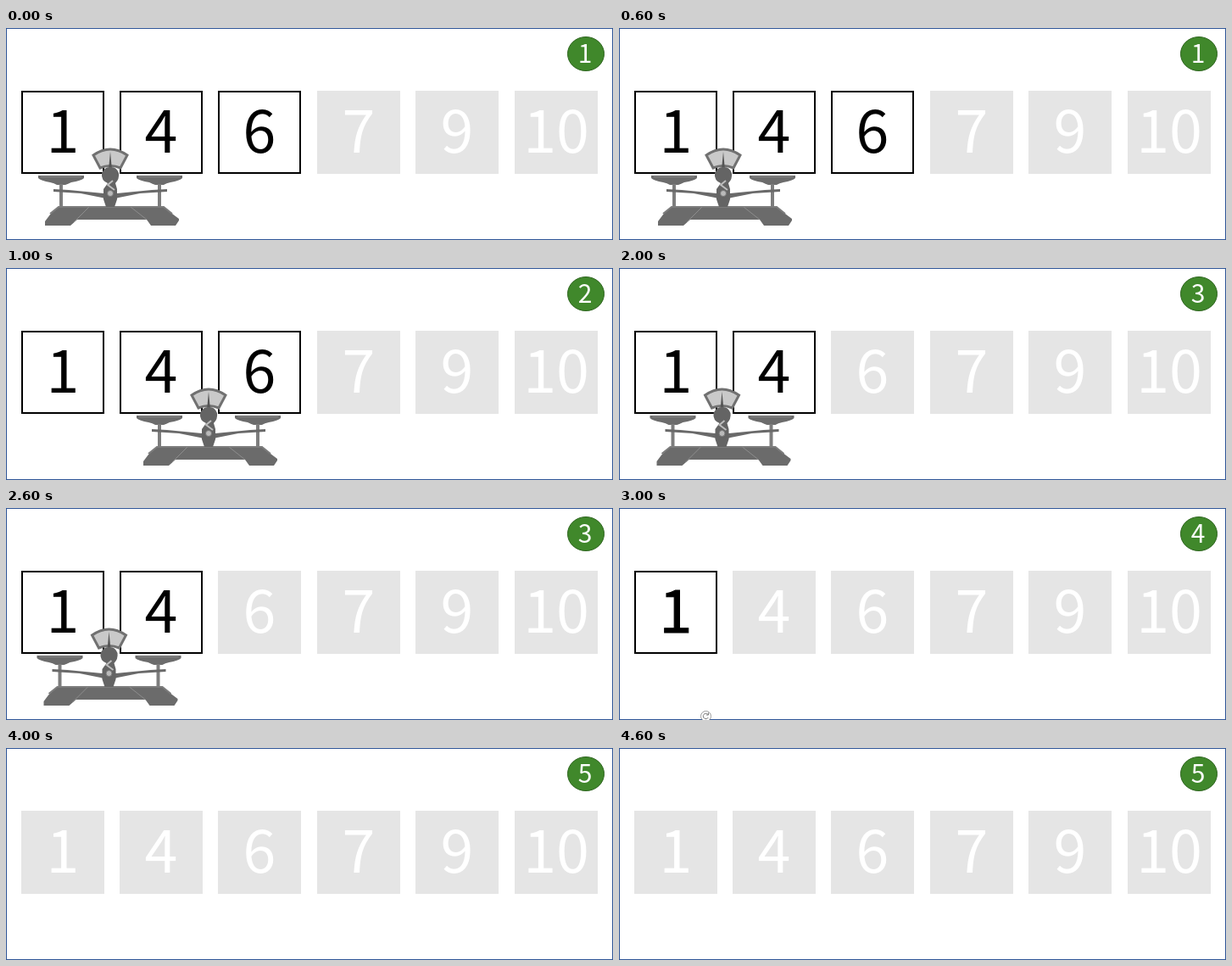
An HTML page that plays this animation: 716 by 250 pixels, repeating every 5 s.

```html
<!DOCTYPE html>
<html lang="en">
<head>
<meta charset="utf-8">
<title>Binary search with a balance</title>
<style>
  html, body { margin: 0; width: 100%; height: 100%; overflow: hidden; background: #fff; }
  svg { display: block; width: 716px; height: 250px; }
  text { font-family: "Noto Sans CJK JP", "Noto Sans CJK", "Noto Sans", sans-serif; font-weight: 350; text-anchor: middle; }
</style>
</head>
<body>
<svg viewBox="0 0 716 250">
  <defs>
    <g id="arm">
      <path d="M-85 174H-31V177Q-34 180 -46 182Q-50 184 -53 185H-63Q-66 183 -71 182Q-82 180 -85 177Z" fill="#6c6c6c"/>
      <path d="M-82 175.5H-34" stroke="#858585"/>
      <path d="M-58 184V212" stroke="#7d7d7d" stroke-width="4"/>
      <path d="M-67 190L-49 191L-8 195L-3 191V202L-10 200L-35 195L-67 193Z" fill="#696969"/>
    </g>
  </defs>
  <rect x=".5" y=".5" width="715" height="249" fill="#fff" stroke="#2f5597"/>
  <g id="cards"></g>
  <g id="scale">
    <use href="#arm"/>
    <use href="#arm" transform="scale(-1 1)"/>
    <path d="M-61 211H63L73 219L81 225V227L77 233H48L43 226H-39L-47 233H-77V228L-71 220Z" fill="#6b6b6b"/>
    <path d="M-71 219L-61 211H63L73 219" fill="none" stroke="#7c7c7c" stroke-width="2"/>
    <path d="M-25 211L-43 229M24 211L43 226" stroke="#8d8d8d"/>
    <path d="M-20 150Q0 136 20 150L12 165Q0 160 -12 165Z" fill="#c9c9c9" stroke="#717171" stroke-width="3"/>
    <path d="M-1.7 164L0 146L1.7 164Z" fill="#555"/>
    <path d="M-10 171Q-6 163 0 164Q7 163 10 171Q11 178 6 183L8 190V202L5 211H-5L-8 202V190L-3 183Q-11 180 -10 171Z" fill="#646464"/>
    <path d="M3 180L-3 185L5 191" fill="none" stroke="#bdbdbd" stroke-width="2"/>
    <circle cy="195" r="3.5" fill="#b9b9b9" stroke="#777"/>
  </g>
  <g id="handle" fill="none" stroke="#777">
    <circle cx="102.5" cy="245.5" r="6" fill="#fff" stroke="#999"/>
    <path d="M105.3 247A3.2 3.2 0 1 1 104.8 243.2M105.5 241.5V244H103"/>
  </g>
  <ellipse cx="684" cy="30.5" rx="21.5" ry="20" fill="#40882b" stroke="#2d641e"/>
  <text id="step" x="683" y="41" font-size="30" fill="#fff"></text>
</svg>
<script>
const byId = id => document.getElementById(id);
const add = (tag, attrs) => {
  const node = document.createElementNS("http://www.w3.org/2000/svg", tag);
  set(node, attrs);
  return byId("cards").appendChild(node);
};
function set(node, attrs) {
  for (const key in attrs) node.setAttribute(key, attrs[key]);
}

const cards = [[1, 18], [4, 134], [6, 250], [7, 367], [9, 483], [10, 600]].map(([value, x]) => {
  const box = add("rect", { x: x + 1, y: 75, width: 96, height: 96, "stroke-width": 2 });
  const label = add("text", { x: x + 49, y: 147, "font-size": 70 });
  label.textContent = value;
  return { box, label };
});

const steps = [
  { active: 3, scale: 123 },
  { active: 3, scale: 239 },
  { active: 2, scale: 121.5 },
  { active: 1, handle: true },
  { active: 0 }
];

const show = (node, visible) => { node.style.display = visible ? "" : "none"; };

function render(time) {
  const index = Math.floor(time / 1000) % steps.length;
  const { active, scale, handle } = steps[index];
  cards.forEach(({ box, label }, i) => {
    const on = i < active;
    set(box, { fill: on ? "#fff" : "#e5e5e5", stroke: on ? "#000" : "#e5e5e5" });
    set(label, { fill: on ? "#000" : "#fff", stroke: on && handle ? "#000" : "none" });
  });
  show(byId("scale"), scale);
  if (scale) set(byId("scale"), { transform: `translate(${scale} 0)` });
  show(byId("handle"), handle);
  byId("step").textContent = index + 1;
}

const start = performance.now();
function tick() {
  render(performance.now() - start);
  requestAnimationFrame(tick);
}
tick();
</script>
</body>
</html>
```
